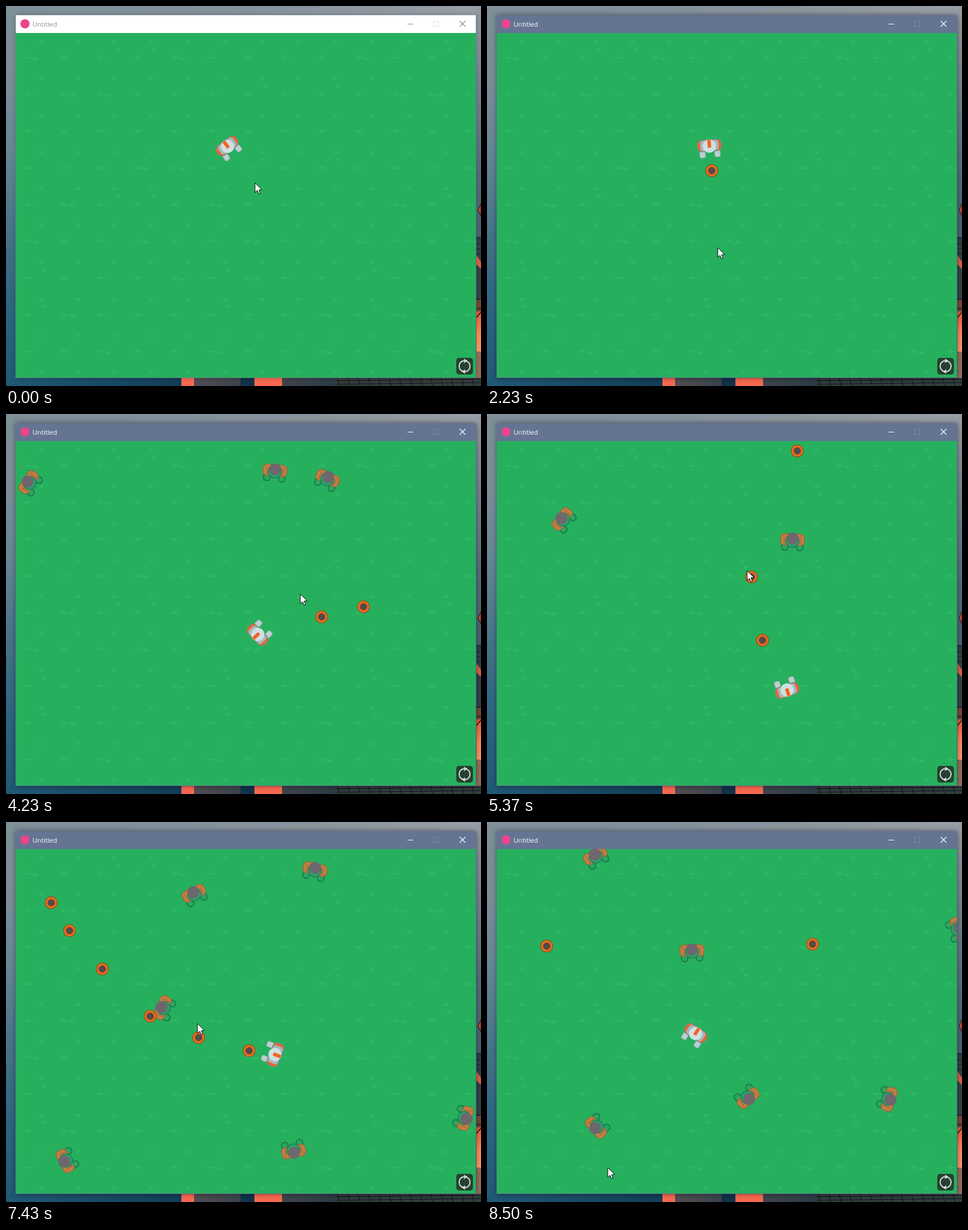
An HTML page with a canvas for the animation above (8530 ms loop, 826x662 px).

```html
<!DOCTYPE html>
<html lang="en">
<head>
<meta charset="utf-8">
<title>Top-down shooter</title>
<style>
html, body { margin: 0; width: 100%; height: 100%; overflow: hidden; }
canvas { display: block; }
</style>
</head>
<body>
<canvas id="stage" width="826" height="662"></canvas>
<script>
const LOOP = 8530, FOCUS = 1950, W = 826, H = 662, STEP = 5;
const ENEMY_SPEED = 0.098, BULLET_SPEED = 0.5, HIT = 17; // px per ms, px
const area = { x: 17, y: 47, w: 800, h: 600 };

// The player's input: key points of time, x, y and the moments of each click
const walk = [
  [0, 387, 247], [2800, 387, 247], [3800, 440, 382], [4400, 440, 382],
  [5370, 521, 478], [6070, 414, 487], [6430, 358, 533], [7430, 465, 404], [8500, 361, 371]];
const aim = [
  [0, 433, 308], [900, 431, 315], [2230, 401, 421], [3200, 640, 330], [4000, 555, 353],
  [4230, 512, 314], [4450, 457, 215], [4660, 505, 220], [5216, 434, 290], [5370, 452, 273],
  [5560, 515, 270], [5720, 526, 231], [5910, 526, 231], [6430, 228, 349], [6780, 250, 340],
  [7013, 290, 366], [7430, 332, 352], [7600, 500, 210], [7750, 250, 295], [8030, 480, 306],
  [8500, 210, 602]];
const clicks = [2150, 2400, 3855, 4003, 4450, 4662, 5037, 5216, 5560, 5721, 5904,
  6466, 6592, 6780, 7013, 7187, 7355, 7600, 7750, 8029];
// Where and when each enemy walks in; from there it chases the player
const spawns = [
  [3140, 608, 19], [3310, 479, 11], [3632, -8, 88], [6180, 575, 664], [6210, -7, 632],
  [6350, 301, 24], [6770, 555, 22], [6970, 841, 526], [8045, 166, 22], [8260, 840, 178]];

function at(path, t) {
  let i = path.findIndex(p => p[0] > t);
  if (i < 0) i = path.length - 1;
  const [t0, x0, y0] = path[i - 1], [t1, x1, y1] = path[i];
  const k = Math.min(1, (t - t0) / (t1 - t0));
  return { x: x0 + (x1 - x0) * k, y: y0 + (y1 - y0) * k };
}

const angle = (a, b) => Math.atan2(b.y - a.y, b.x - a.x);
const near = (a, b) => Math.hypot(a.x - b.x, a.y - b.y) < HIT;

function move(p, direction, speed) {
  p.x += Math.cos(direction) * speed * STEP;
  p.y += Math.sin(direction) * speed * STEP;
}

// Fixed steps, so that the state follows from the time alone
let world;
function reset() {
  world = { time: 0, enemies: [], bullets: [] };
}

function advance() {
  const from = world.time, now = world.time += STEP;
  const due = t => t > from && t <= now;
  const player = at(walk, now);
  for (const e of world.enemies) move(e, angle(e, player), ENEMY_SPEED);
  for (const b of world.bullets) move(b, b.direction, BULLET_SPEED);
  for (const [t, x, y] of spawns) if (due(t)) world.enemies.push({ x, y });
  if (clicks.some(due)) {
    world.bullets.push({ ...player, direction: angle(player, at(aim, now)) });
  }
  const alive = world.enemies.filter(e => !world.bullets.some(b => near(b, e)));
  world.bullets = world.bullets.filter(b => !world.enemies.some(e => near(b, e)));
  world.enemies = alive;
}

let g;

function box(x, y, w, h, fill, r = 0) {
  g.beginPath();
  g.roundRect(x, y, w, h, r);
  g.fillStyle = fill;
  g.fill();
}

function poly(points, fill, x = 0, y = 0) {
  g.beginPath();
  for (let i = 0; i < points.length; i += 2) g.lineTo(x + points[i], y + points[i + 1]);
  g.closePath();
  g.fillStyle = fill;
  g.fill();
}

function outline(color, width) {
  g.strokeStyle = color;
  g.lineWidth = width;
  g.stroke();
}

function disc(x, y, r, fill) {
  g.beginPath();
  g.arc(x, y, r, 0, 7);
  g.fillStyle = fill;
  g.fill();
}

function line(color, width, x0, y0, x1, y1) {
  g.beginPath();
  g.moveTo(x0, y0);
  g.lineTo(x1, y1);
  outline(color, width);
}

// A box shaded from one side to the other
function shade(x, y, w, h, colors, down) {
  const f = g.createLinearGradient(x, y, down ? x : x + w, down ? y + h : y);
  colors.forEach((c, i) => f.addColorStop(i / (colors.length - 1), c));
  box(x, y, w, h, f);
}

function desktop() {
  shade(0, 0, W, H, ['#7e8f98', '#7a8e98', '#648695', '#457389', '#2c657f', '#205a76'], true);
  shade(0, 0, W, 17, ['#7f9099', '#82919b', '#8b969f', '#9a9fa8']);
  shade(817, 0, 9, 420, ['#969ca6', '#77858f', '#566f80', '#466273'], true);
  shade(0, 647, 305, 15, ['#205a76', '#123d57']);
  box(305, 647, 22, 15, '#f96a51');
  shade(327, 647, 81, 15, ['#514c52', '#3b444b']);
  box(408, 647, 24, 15, '#0f3349');
  box(432, 647, 48, 15, '#f96a51');
  shade(480, 647, 92, 15, ['#41434a', '#2a3c46']);
  box(572, 647, 254, 15, '#333d40');
  for (let x = 576; x < W; x += 18) line('#0d1215', 1, x, 647, x + 4, 662);
  for (const y of [653, 659]) line('#0d1215', 1, 572, y, W, y - 3);
  poly([826, 344, 821, 355, 826, 366], '#d94a40');
  outline('#151515', 1);
  box(818, 402, 8, 108, '#33434a');
  for (let y = 405; y < 436; y += 9) line('#10202a', 1, 818, y, W, y);
  poly([818, 434, 826, 446, 826, 458, 818, 450], '#de6448');
  box(818, 510, 8, 22, '#764a3c');
  for (const y of [511, 527]) line('#151515', 1.5, 818, y, W, y);
  shade(818, 532, 8, 70, ['#e85b3c', '#ff8a54', '#ff9c68'], true);
  line('#151515', 1.5, 818, 543, W, 533);
  box(818, 602, 8, 46, '#97705c');
}

// A few blades leaning outwards from one root
function tuft(x, y, blades) {
  for (let i = 0; i < blades; i++) {
    const lean = (i - (blades - 1) / 2) * 4;
    poly([lean / 2 - 2, 3, lean * 1.3, -4 + Math.abs(lean) / 2, lean / 2 + 2, 2], '#2fbb69', x, y);
  }
}

function grass() {
  box(area.x, area.y, area.w, area.h, '#26b05e');
  g.beginPath();
  g.rect(area.x, area.y, area.w, area.h);
  g.clip();
  for (let row = 0; row < 10; row++) for (let col = 0; col < 13; col++) {
    const x = area.x + col * 64, y = area.y + row * 64;
    const pick = (col * 7 + row * 11 + col * row) % 9;
    tuft(x + 21, y + 42, 4);
    tuft(x + 44, y + 15, 2);
    if (pick < 2) tuft(x + 34, y + 44, 3);
    if (pick === 3 || pick === 5) tuft(x + 49, y + 28, 2);
  }
}

function layer(draw) {
  const c = document.createElement('canvas');
  c.width = W;
  c.height = H;
  g = c.getContext('2d');
  draw();
  return c;
}
const backdrop = layer(desktop), field = layer(grass);

function titleBar(active) {
  const ink = active ? '#fff' : '#8f8f8f';
  g.save();
  g.shadowColor = active ? 'rgba(0,0,0,.5)' : 'rgba(0,0,0,.25)';
  g.shadowBlur = 9;
  box(16.5, 16, 801, 632, active ? '#647492' : '#5f8a78');
  g.restore();
  box(17, 16, 800, 31, active ? '#647492' : '#fff');
  disc(33, 31, 8, '#e8478a');
  g.font = '11.5px "Open Sans", "Noto Sans", sans-serif';
  g.fillStyle = ink;
  g.fillText('Untitled', 46, 36);
  line(ink, 1, 698, 31.5, 708, 31.5);
  line(ink, 1.2, 789, 26, 799, 36);
  line(ink, 1.2, 799, 26, 789, 36);
  g.beginPath();
  g.rect(743.5, 26.5, 9, 9);
  outline(active ? '#7d8ba5' : '#e2e2e2', 1);
}

function posed(p, target, draw) {
  g.save();
  g.translate(p.x, p.y);
  g.rotate(angle(p, target));
  draw();
  g.restore();
}

// Both figures face +x
function hero() {
  for (const y of [-13, 13]) {
    box(5, y - 5, 12, 10, '#bccfd1', 3);
    outline('#6fa596', 1);
  }
  box(-14, -21, 20, 42, '#f0622a', 8);
  outline('#6f8f80', 1.5);
  box(-13, -16, 18, 32, '#a3b9bf', 5);
  disc(-3, 0, 11.5, '#cfe0e2');
  box(-14, -3, 14, 6, '#f26322', 1);
}

function zombie() {
  for (const y of [-13, 13]) {
    box(3, y - 5.5, 14, 11, '#28a861', 5);
    outline('#1b7a48', 2);
  }
  box(-12, -21, 20, 42, '#c67d40', 7);
  outline('#85703f', 1.5);
  for (const y of [-15, 15]) line('#9c6c42', 1.5, -8, y, 7, y * 0.9);
  disc(0, 0, 11.5, '#2c9f6c');
  outline('#218055', 1.5);
  disc(-4, 0, 10.5, '#6e676d');
}

function bullet({ x, y }) {
  disc(x, y, 10.5, '#ee6c1a');
  outline('#8a5424', 1.2);
  disc(x, y, 6, '#54494c');
  outline('#7d4a2c', 1);
}

function recorder() {
  box(783, 613, 29, 29, '#25412f', 5);
  for (const turn of [0, Math.PI]) {
    g.save();
    g.translate(797.5, 627.5);
    g.rotate(turn);
    g.beginPath();
    g.arc(0, 0, 9.5, -1.3, 1.45);
    outline('#d5dfda', 2);
    poly([-1, -13, 5, -9.5, -1, -5.5], '#d5dfda');
    g.restore();
  }
}

function pointer({ x, y }) {
  poly([0, 0, 0, 17, 4, 13.5, 6.6, 19.5, 9.2, 18.3, 6.7, 12.4, 12, 12], '#fff', x, y);
  outline('#000', 1);
}

const ctx = stage.getContext('2d');
function frame() {
  const t = performance.now() % LOOP;
  const player = at(walk, t), cursor = at(aim, t);
  if (!world || t < world.time) reset();
  while (world.time + STEP <= t) advance();

  g = ctx;
  g.drawImage(backdrop, 0, 0);
  titleBar(t >= FOCUS);
  g.drawImage(field, 0, 0);

  g.save();
  g.beginPath();
  g.rect(area.x, area.y, area.w, area.h);
  g.clip();
  posed(player, cursor, hero);
  for (const e of world.enemies) posed(e, player, zombie);
  world.bullets.forEach(bullet);
  g.restore();

  recorder();
  pointer(cursor);
  requestAnimationFrame(frame);
}
frame();
</script>
</body>
</html>
```
